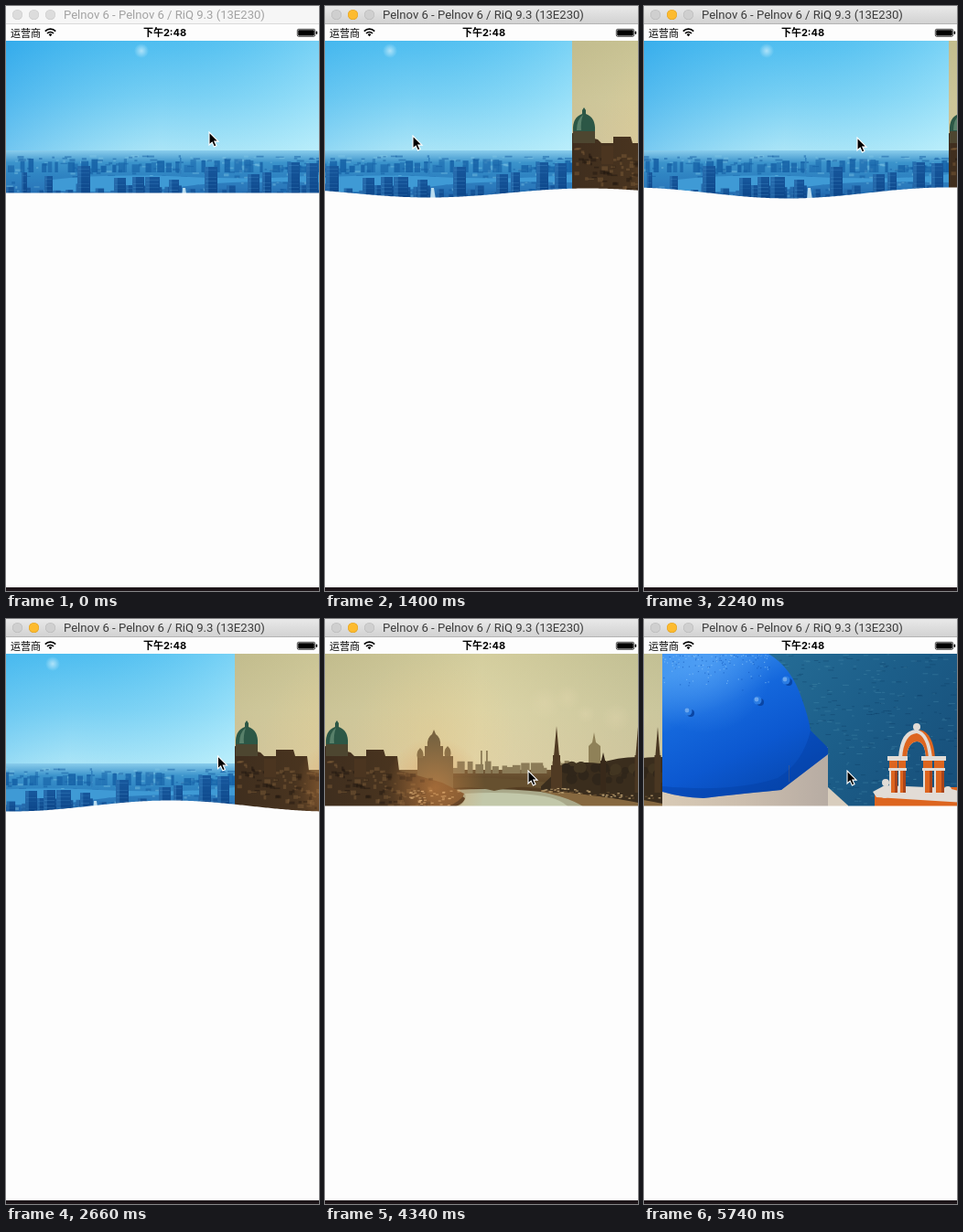
These frames come from a looping animation (342x640 px, 5880 ms). An HTML page with a canvas:

```html
<!DOCTYPE html>
<html lang="zh">
<head>
<meta charset="utf-8">
<title>Wave banner</title>
<style>
html, body { margin: 0; width: 100%; height: 100%; overflow: hidden; background: #fdfdfd; }
#stage { position: relative; width: 342px; height: 640px; overflow: hidden; background: #fdfdfd; }
#stage > * { position: absolute; }
#bar { left: 0; top: 0; width: 342px; height: 20px; box-sizing: border-box; background: #f6f6f6; border-bottom: 1px solid #dadada; }
#bar i { position: absolute; top: 4px; width: 11px; height: 11px; border-radius: 50%; background: #dcdcdc; box-shadow: inset 0 0 0 .5px #cbcbcb; }
#bar span { position: absolute; left: 63px; top: 0; font: 13.1px/19px Roboto, Inter, sans-serif; color: #a3a3a3; white-space: pre; }
#bar.on { background: linear-gradient(#e9e9e9, #d2d2d2); border-color: #b4b4b4; }
#bar.on i { background: #cfcfcf; box-shadow: inset 0 0 0 .5px #b9b9b9; }
#bar.on .min { background: #fdbb2f; box-shadow: inset 0 0 0 .5px #dfa023; }
#bar.on span { color: #3c3c3c; }
.status { top: 20px; height: 18px; color: #000; white-space: pre; }
#carrier { left: 5px; font: 11px/18px "Noto Sans CJK SC", "Noto Sans CJK", sans-serif; }
#clock { left: 0; width: 347px; text-align: center; font: bold 11px/18px Inter, "Noto Sans CJK SC", "Noto Sans CJK", sans-serif; }
#icons { left: 0; top: 20px; }
#banner { left: 0; top: 38px; }
#foot { left: 0; top: 636px; width: 342px; height: 4px; background: #1d1519; }
#cursor { left: 0; top: 0; }
</style>
</head>
<body>
<div id="stage">
  <div id="bar"><i style="left:7px"></i><i class="min" style="left:25px"></i><i style="left:43px"></i><span>Pelnov 6 - Pelnov 6 / RiQ 9.3 (13E230)</span></div>
  <div class="status" id="carrier">运营商</div>
  <div class="status" id="clock">下午2:48</div>
  <svg id="icons" width="342" height="18">
    <g fill="none" stroke="#000" stroke-width="1.7">
      <path d="M42.8 7.6A8 8 0 0 1 54.2 7.6M45 10A5 5 0 0 1 52 10"/>
      <rect x="318.3" y="5.3" width="19.4" height="8" rx="1.5" stroke-width=".7"/>
    </g>
    <path d="M46.6 11.2A2.7 2.7 0 0 1 50.4 11.2L48.5 13.3Z"/>
    <rect x="319.2" y="6.2" width="17.6" height="6.2" rx=".8"/>
    <rect x="338.6" y="7.6" width="1.6" height="3.4" rx=".8"/>
  </svg>
  <canvas id="banner" width="342" height="176"></canvas>
  <div id="foot"></div>
  <svg id="cursor" width="14" height="20" viewBox="-1 -1 14 20">
    <path d="M0 0V14L3.2 11.1L5.4 16L8 14.8L5.8 10.1H10Z" fill="#000" stroke="#fff" stroke-width="1.1"/>
  </svg>
</div>
<script>
// the phone screen (W) is a little wider than the stage
const W = 347, TOP = 38, H = 176, LOOP = 5880, STEP = 140;
const $ = id => document.getElementById(id);
const ctx = $('banner').getContext('2d');

// time, cursor x, cursor y
const POINTER = [[0, 222, 138], [280, 222, 138], [840, 120, 135], [1400, 96, 142],
  [2240, 233, 144], [3360, 228, 163], [3920, 222, 166]];
// time, scroll offset
const SCROLL = [[280, 0], [840, 64], [1400, 77], [2240, 14], [2380, 14], [3220, W], [4480, W], [5970, W * 2]];
// time, wave height
const SWELL = [[280, 0], [700, 6], [1120, 5.6], [1400, 5], [2240, 6], [2800, 6], [3360, 4.5], [3920, 0]];

const smooth = u => (1 - Math.cos(Math.PI * u)) / 2;

function at(table, t, col = 1) {
  const n = table.findIndex(row => row[0] > t);
  if (n === 0) return table[0][col];
  if (n < 0) return table[table.length - 1][col];
  const a = table[n - 1], b = table[n];
  return a[col] + (b[col] - a[col]) * smooth((t - a[0]) / (b[0] - a[0]));
}

function random(seed) {
  return () => (seed = (seed * 16807) % 2147483647) / 2147483647;
}

const strip = document.createElement('canvas');
strip.width = W * 3;
strip.height = H;
const g = strip.getContext('2d');

function fade(x0, y0, x1, y1, ...colors) {
  const f = g.createLinearGradient(x0, y0, x1, y1);
  colors.forEach((c, n) => f.addColorStop(n / (colors.length - 1), c));
  return f;
}
function glow(x, y, r, rgb, a) {
  const f = g.createRadialGradient(x, y, 0, x, y, r);
  f.addColorStop(0, `rgba(${rgb},${a})`);
  f.addColorStop(1, `rgba(${rgb},0)`);
  box(x - r, y - r, r * 2, r * 2, f);
}
function box(x, y, w, h, fill) {
  g.fillStyle = fill;
  g.fillRect(x, y, w, h);
}
function shape(d, fill) {
  g.fillStyle = fill;
  g.fill(new Path2D(d));
}
function dot(x, y, r, fill) {
  g.fillStyle = fill;
  g.beginPath();
  g.arc(x, y, r, 0, 7);
  g.fill();
}
function page(n, draw) {
  g.save();
  g.translate(W * n, -TOP);
  g.beginPath();
  g.rect(0, TOP, W, H);
  g.clip();
  draw(random(41 + n * 977));
  g.restore();
}

function tower(x, y, w, r) {
  box(x, y, w, 220 - y, fade(0, y, 0, 212, '#17589d', '#0b4386'));
  box(x, y, w * .3, 220 - y, 'rgba(70,150,210,.35)');
  for (let k = y + 3; k < 212; k += 4) box(x + 1, k, w - 2, 1, `rgba(90,165,220,${r() * .25})`);
}

function blueCity(r) {
  box(0, TOP, W, H, fade(0, 38, 0, 160, '#4fbdf0', '#7dd1f4', '#b9eaf8'));
  box(0, TOP, W, 122, fade(0, 60, W, 90, 'rgba(20,150,230,.45)', 'rgba(80,195,240,.12)', 'rgba(190,245,255,.4)'));
  glow(148, 49, 8, '235,250,255', .6);
  box(0, 158, W, 56, fade(0, 158, 0, 212, '#8acdec', '#3b93cb', '#2f84c2', '#2b79bb', '#1b60a8'));
  for (let k = 0; k < 260; k++) {
    const y = 163 + r() * 45;
    box(r() * W, y, 2 + r() * 7, 1 + r() * 2, r() < .55 ? 'rgba(15,85,155,.45)' : 'rgba(130,200,230,.4)');
  }
  shape('M50 190Q110 183 200 187T347 184V193Q240 190 190 198T50 202Z', '#3f9ad5');
  for (let x = 2; x < W; x += 5 + r() * 10) {
    const h = 6 + r() * 9;
    box(x, 182 - h, 3 + r() * 6, h, `rgba(20,95,165,${.45 + r() * .4})`);
  }
  for (let x = 0; x < W; x += 8 + r() * 10) tower(x, 194 + r() * 12, 6 + r() * 8, r);
  [[17, 182, 6], [42, 186, 9], [78, 175, 14], [118, 188, 13], [138, 187, 13], [152, 187, 16], [178, 190, 11],
    [217, 176, 14], [264, 184, 13], [280, 182, 10], [308, 171, 13], [328, 172, 13]]
    .forEach(([x, y, w]) => tower(x, y, w, r));
  box(190, 166, 1.5, 18, '#2f7fbd');
  shape('M193 199L196 199L198 212H192Z', '#b9dcef');
}

function spire(x, top, y, w, fill) {
  shape(`M${x} ${top}L${x + w * .36} ${y}H${x - w * .36}Z`, fill);
  box(x - w / 2, y, w, 190 - y, fill);
}

function riverTown(r) {
  box(0, TOP, W, H, fade(0, 38, 0, 165, '#cdc898', '#d9d2a5', '#dfd0a6'));
  box(0, TOP, W, 130, fade(0, 0, W, 20, 'rgba(160,152,108,.25)', 'rgba(228,219,172,.3)', 'rgba(170,172,138,.3)'));
  [[240, 92, 18], [265, 86, 14], [318, 108, 16], [285, 104, 10]].forEach(c => glow(...c, '235,220,180', .25));
  glow(120, 130, 90, '235,200,130', .3);
  box(0, 165, W, 50, fade(0, 165, 0, 212, '#705735', '#50391f', '#392718'));
  for (let x = 138; x < W; x += 5 + r() * 7) {
    const h = 3 + r() * 8;
    box(x, 166 - h, 5 + r() * 9, h + 3, '#8b7b57');
  }
  box(170, 144, 1.8, 22, '#8d7c56');
  box(176, 144, 1.8, 22, '#8d7c56');
  // river and bridge
  shape('M140 187Q190 184 236 189Q275 194 300 203V214H112Q152 206 153 196Z', '#a9a98a');
  shape('M153 191Q200 188 240 194Q264 198 272 214H126Q158 204 153 191Z', '#c2c8aa');
  shape('M124 174Q180 171 246 179V187Q215 180 185 188Q155 181 124 187Z', '#66502f');
  // cathedral
  shape('M119 121L121 126Q127 130 126 139H129V150H140V190H101V150H109V139H112Q111 130 117 126Z', '#786340');
  [[104, 141], [134, 139]].forEach(([x, y]) => {
    shape(`M${x} ${y}Q${x + 5} ${y + 5} ${x + 3} ${y + 11}H${x - 3}Q${x - 5} ${y + 5} ${x} ${y}Z`, '#806c46');
  });
  // left bank
  shape('M0 139L28 146L32 150H45V143H64L66 150H79L81 166L104 172L128 179L152 191Q150 201 112 214H0Z',
    fade(0, 0, 150, 0, '#3f2e1e', '#49341f', '#76512d'));
  box(1, 136, 24, 14, '#4d4630');
  shape('M1 137Q0 122 11 118V114L13 111L15 114V118Q26 122 25 137Z', '#2c5746');
  shape('M5 136Q5 124 12 119Q9 127 10 136Z', '#58806a');
  for (let k = 0; k < 110; k++) {
    const x = r() * 115;
    box(x, 152 + x * .16 + r() * 40, 2 + r() * 5, 1 + r() * 4, r() < .55 ? 'rgba(135,100,60,.4)' : 'rgba(30,21,15,.45)');
  }
  box(32, 153, 13, 20, '#4b3520');
  for (let k = 0; k < 45; k++) box(90 + r() * 55, 186 + r() * 17, 3, 1.2, 'rgba(235,200,145,.6)');
  // right bank
  shape('M288 139L292 135L294 124L296 135L301 139V160H288Z', '#8f8158');
  shape('M236 186L347 200V214H292Q280 198 236 189Z', '#86683f');
  shape('M236 183L258 162Q275 155 300 158Q322 150 347 151V202Q300 192 236 187Z', '#3a2d1d');
  for (let k = 0; k < 24; k++) dot(260 + r() * 87, 161 + r() * 16, 3 + r() * 4, r() < .5 ? '#423521' : '#30261a');
  spire(253, 117, 149, 8, '#503a23');
  box(247, 160, 12, 25, '#503a23');
  spire(304, 146, 155, 6, '#38291a');
  spire(342, 118, 149, 7, '#4a3722');
  for (let k = 0; k < 60; k++) {
    const x = 236 + r() * 111;
    box(x, 183 + (x - 236) * .08 + r() * 5, 2.6, 1.2, r() < .6 ? '#b89d70' : '#60492c');
  }
  glow(120, 185, 55, '225,145,75', .5);
}

function domeAndBells(r) {
  box(0, TOP, W, H, fade(90, 38, 310, 212, '#276f98', '#1c5e89', '#174e79'));
  for (let k = 0; k < 520; k++) {
    box(100 + r() * 247, 38 + r() * 172, 2 + r() * 5, 1, r() < .5 ? 'rgba(75,145,175,.35)' : 'rgba(8,50,90,.3)');
  }
  // wall and dome
  shape('M0 180L128 182L181 140V214H0Z', fade(0, 0, 181, 0, '#d8cab5', '#cbbdad', '#b7aca3'));
  shape('M181 184L203 204V214H181Z', '#d8cdbd');
  shape('M0 38H116Q141 53 152 86Q160 108 162 122L181 141L181 148L130 187Q70 193 45 196Q20 195 0 189Z',
    fade(60, 38, 130, 185, '#3d92ee', '#1467dc', '#0c58d0', '#0749b3'));
  shape('M162 122L181 141V148L130 187Q70 193 45 196Q20 195 0 189V183Q78 190 126 174Q154 157 162 122Z', 'rgba(4,60,160,.4)');
  glow(45, 50, 75, '95,170,250', .5);
  for (let k = 0; k < 150; k++) {
    box(r() * 118, 39 + r() * r() * 45, 1.2, 1.2, r() < .5 ? 'rgba(5,70,170,.45)' : 'rgba(140,200,250,.6)');
  }
  [[28, 101], [104, 89], [135, 67]].forEach(([x, y]) => {
    dot(x + 3, y + 2, 4, '#0945a4');
    dot(x, y, 4.5, '#2b7ce2');
    dot(x - 1, y - 1, 2.4, '#6aa6ee');
  });
  box(138, 160, 1, 18, 'rgba(120,105,95,.35)');
  // bell tower
  const orange = '#dd651f', white = '#e2dcd6', shade = '#a9441a';
  shape('M232 190L246 184H347V214H232Z', orange);
  shape('M230 189L243 182L312 185L347 194V202L234 195Z', white);
  shape('M281 121Q296 124 298 152L290 150Z', orange);
  shape('M258 152Q260 121 278 121Q292 124 295 152H288Q287 134 278 134Q268 135 267 152Z', white);
  shape('M262 152Q264 126 278 125Q289 128 291 152H288Q287 134 278 134Q268 135 267 152Z', orange);
  [[248, 9], [258, 8], [285, 10], [297, 11]].forEach(([x, w]) => {
    box(x, 154, w, 36, orange);
    box(x + w - 3, 166, 3, 24, shade);
    box(x, 166, 2, 24, white);
    box(x - 1, 163, w + 2, 3, white);
  });
  box(246, 150, 22, 5, white);
  box(283, 150, 27, 5, white);
  dot(278, 118, 4, white);
  box(276, 120, 4, 5, white);
  [[244, 179], [312, 187], [243, 192]].forEach(([x, y]) => dot(x, y, 4, white));
}

[blueCity, riverTown, domeAndBells].forEach((draw, n) => page(n, draw));

function render(time) {
  const t = Math.floor((time % LOOP) / STEP) * STEP;
  ctx.clearRect(0, 0, W, H);
  ctx.drawImage(strip, -Math.round(at(SCROLL, t)), 0);

  const swell = at(SWELL, t), trough = 316 - .361 * (t - 840);
  ctx.fillStyle = '#fdfdfd';
  ctx.beginPath();
  ctx.moveTo(0, H);
  for (let x = 0; x <= W; x += 2) {
    ctx.lineTo(x, 204.5 - TOP + swell * Math.cos(2 * Math.PI * (x - trough) / W));
  }
  ctx.lineTo(W, H);
  ctx.fill();

  $('bar').classList.toggle('on', t >= 280);
  $('cursor').style.transform = `translate(${at(POINTER, t) - 1}px, ${at(POINTER, t, 2) - 1}px)`;
}

const start = performance.now();
function tick() {
  render(performance.now() - start);
  requestAnimationFrame(tick);
}
tick();
</script>
</body>
</html>
```
